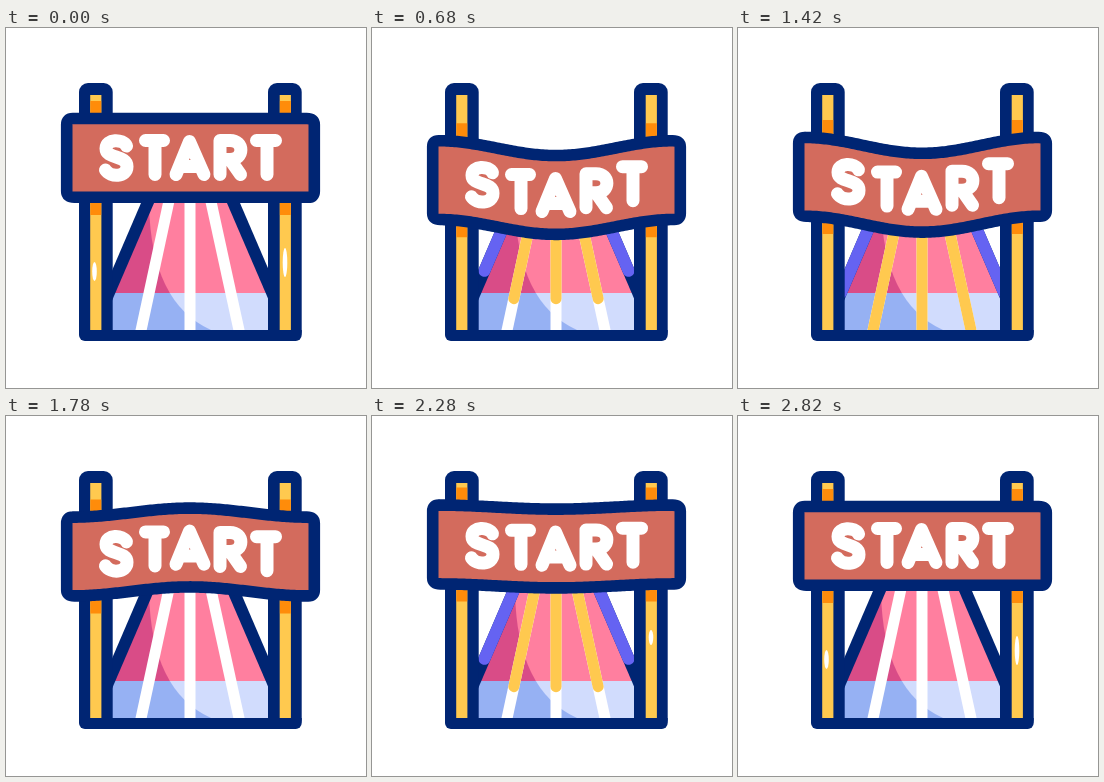
An HTML page with a canvas for the animation above (3260 ms loop, 360 by 360 pixels).

```html
<!DOCTYPE html>
<html lang="en">
<head>
<meta charset="utf-8">
<title>Start gate</title>
<style>
  html, body { margin: 0; width: 100%; height: 100%; overflow: hidden; background: #fff; }
  canvas { display: block; width: 360px; height: 360px; }
</style>
</head>
<body>
<canvas id="stage" role="img" aria-label="START"></canvas>
<script>
const LOOP = 3260;
const NAVY = '#002573', YELLOW = '#ffc94f', ORANGE = '#ff8c0a', RED = '#d36b5d', VIOLET = '#6563f2';
const MID = 184.5, HORIZON = 145, GROUND = 302;

const canvas = document.getElementById('stage');
const ctx = canvas.getContext('2d');
const ratio = window.devicePixelRatio || 1;
canvas.width = canvas.height = 360 * ratio;

// [time, value] keys: height of the banner's ends, and how far its middle trails them
const heightKeys = [[220, 85], [540, 130], [860, 74], [1280, 130], [1600, 66], [1980, 130],
  [2135, 132], [2470, 11], [2700, 90], [2820, 85]];
const sagKeys = [[220, 0], [380, -9], [540, 0], [690, 15], [860, 0], [1010, -9], [1280, 0],
  [1430, 16], [1600, 0], [1780, -9], [1980, 0], [2280, 4], [2370, 13], [2470, 0], [2590, -11],
  [2710, 3], [2820, 0]];

const letters = [
  [110, 'M120.5 118.5C117 111 100 111 100 121C100 132 121 127 121 139C121 150 104 150 99.5 142.5'],
  [149, 'M139.5 113H157.5M149 113V147'],
  [184, 'M170 147L183.5 114L198 147M175 139H193'],
  [224, 'M214 147V113H224C238.5 113 238.5 132 224 132H216M224 132L234.5 147'],
  [261, 'M250.5 113H269.5M261 113V147']
].map(([x, d]) => [x, new Path2D(d)]);

const clamp = u => Math.min(1, Math.max(0, u));
const ease = u => (1 - Math.cos(Math.PI * clamp(u))) / 2;

function sample(keys, t) {
  if (t <= keys[0][0]) return keys[0][1];
  for (let i = 1; i < keys.length; i++) {
    const [t0, a] = keys[i - 1], [t1, b] = keys[i];
    if (t < t1) return a + (b - a) * ease((t - t0) / (t1 - t0));
  }
  return keys[keys.length - 1][1];
}

function box(x, y, w, h, color, r = 0) {
  ctx.fillStyle = color;
  ctx.beginPath();
  ctx.roundRect(x, y, w, h, r);
  ctx.fill();
}

// Lane running down from the horizon, between two heights
function lane([half, slope, width], y0, y1, color, cap) {
  const x = y => MID + half + slope * (y - 176);
  ctx.strokeStyle = color;
  ctx.lineWidth = width;
  ctx.lineCap = cap;
  ctx.beginPath();
  ctx.moveTo(x(y0), y0);
  ctx.lineTo(x(y1), y1);
  ctx.stroke();
}

const edges = [[-43.4, -.43, 12], [43.4, .43, 12]];
const stripes = [[-22.2, -.216, 11], [-.5, 0, 11], [21, .218, 11]];

function drawTrack(t) {
  const halfAt = y => 43.4 + .43 * (y - 176);
  ctx.save();
  ctx.beginPath();
  ctx.rect(80, HORIZON, 210, GROUND + 4 - HORIZON);
  ctx.clip();

  ctx.save();
  ctx.beginPath();
  ctx.moveTo(MID - halfAt(HORIZON), HORIZON);
  ctx.lineTo(MID + halfAt(HORIZON), HORIZON);
  ctx.lineTo(MID + halfAt(GROUND), GROUND);
  ctx.lineTo(MID - halfAt(GROUND), GROUND);
  ctx.clip();
  box(80, HORIZON, 210, 265 - HORIZON, '#d94c87');
  box(80, 265, 210, 40, '#96b1f3');
  ctx.beginPath();
  ctx.moveTo(143, HORIZON);
  ctx.lineTo(143, 176);
  ctx.quadraticCurveTo(145, 275, 205, GROUND);
  ctx.lineTo(290, GROUND);
  ctx.lineTo(290, HORIZON);
  ctx.clip();
  box(80, HORIZON, 210, 265 - HORIZON, '#ff7f9f');
  box(80, 265, 210, 40, '#d1dcfd');
  ctx.restore();

  for (const stripe of stripes) lane(stripe, HORIZON - 8, GROUND + 8, '#fff', 'butt');
  for (const edge of edges) lane(edge, HORIZON - 8, 280, NAVY, 'butt');

  // Coloured dashes run away into the distance, three times
  if (t > 220 && t < 2620) {
    const phase = (t - 220) % 800;
    const head = clamp((phase - 120) / 240), tail = clamp((phase - 400) / 245);
    if (head > 0 && tail < 1) {
      const dash = (line, bottom, color) => {
        const length = bottom - 176;
        const reach = head < 1 ? bottom - length * head : HORIZON - 8;
        lane(line, reach, bottom - length * tail, color, 'round');
      };
      for (const edge of edges) dash(edge, 265, VIOLET);
      for (const stripe of stripes) dash(stripe, GROUND, YELLOW);
    }
  }
  ctx.restore();
}

function drawGlint(x, y, h) {
  ctx.fillStyle = '#fff';
  ctx.beginPath();
  ctx.ellipse(x, y + h / 2, 2.3, h / 2, 0, 0, 7);
  ctx.fill();
}

function drawPosts(top, t) {
  for (const [x, core] of [[73, 84.2], [262, 273.7]]) {
    box(x, 55, 33.7, 258, NAVY, 9);
    box(core, 67, 11.2, 235, YELLOW);
    ctx.save();
    ctx.beginPath();
    ctx.rect(core, 67, 11.2, 235);
    ctx.clip();
    box(core, top - 12, 11.2, 114, ORANGE);
    ctx.restore();
  }
  box(73, GROUND, 222.7, 11, NAVY, [0, 0, 6, 6]);
  const resting = t < 220 || t > 2400;
  if (resting) drawGlint(88.5, 234, 19);
  if (resting) drawGlint(279, 220, 29);
  else if (t > 2260) drawGlint(279, 214, 15);
}

function drawBanner(top, sag) {
  const bend = x => sag * Math.cos(Math.PI / 2 * Math.min(1, Math.abs(x - 184) / 118)) ** 2;
  const left = 60.7, right = 308.3, up = top + 5.5, down = top + 84.3, r = 6;

  ctx.beginPath();
  ctx.moveTo(left, up + r);
  ctx.quadraticCurveTo(left, up, left + r, up);
  for (let x = left + r; x <= right - r; x += 2) ctx.lineTo(x, up + bend(x));
  ctx.quadraticCurveTo(right, up, right, up + r);
  ctx.lineTo(right, down - r);
  ctx.quadraticCurveTo(right, down, right - r, down);
  for (let x = right - r; x >= left + r; x -= 2) ctx.lineTo(x, down + bend(x));
  ctx.quadraticCurveTo(left, down, left, down - r);
  ctx.closePath();
  ctx.fillStyle = RED;
  ctx.fill();
  ctx.lineJoin = ctx.lineCap = 'round';
  ctx.strokeStyle = NAVY;
  ctx.lineWidth = 11.6;
  ctx.stroke();

  ctx.strokeStyle = '#fff';
  ctx.lineWidth = 13;
  for (const [x, path] of letters) {
    ctx.save();
    ctx.translate(0, top - 85.5 + bend(x));
    ctx.stroke(path);
    ctx.restore();
  }
}

function draw(now) {
  const t = now % LOOP;
  const top = sample(heightKeys, t);
  ctx.setTransform(ratio, 0, 0, ratio, 0, 0);
  box(0, 0, 360, 360, '#fff');
  drawTrack(t);
  drawPosts(top, t);
  drawBanner(top, sample(sagKeys, t));
}

const start = performance.now();
function tick() {
  draw(performance.now() - start);
  requestAnimationFrame(tick);
}
tick();
</script>
</body>
</html>
```
